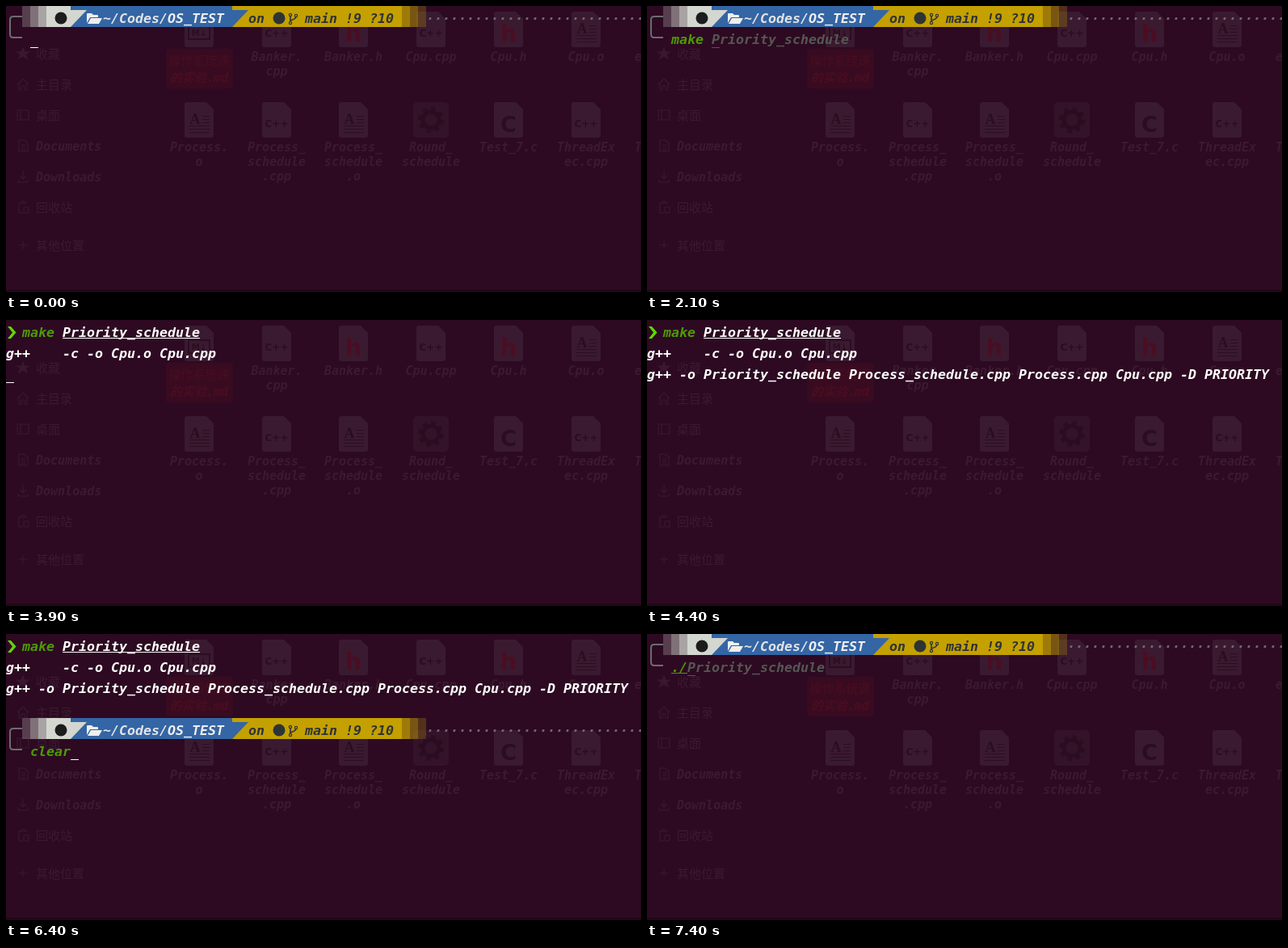
Recreate the animation shown at these times as an HTML page. Size 786x354 px, loop 8000 ms.

```html
<!DOCTYPE html>
<html lang="en">
<head>
<meta charset="utf-8">
<title>Terminal session</title>
<style>
  html, body { margin: 0; width: 100%; height: 100%; overflow: hidden; background: #2d0a22; }
  svg { display: block; width: 786px; height: 354px; }
  text { white-space: pre; font-family: "DejaVu Sans Mono", "Noto Sans CJK SC", monospace; font-weight: bold; font-style: oblique; }
  #screen text { font-size: 16.61px; }
  #desktop text { font-size: 15px; fill: #3b1a30; }
  #desktop .cjk { font-family: "Noto Sans CJK SC", "Noto Sans CJK", sans-serif; font-weight: normal; font-style: normal; }
  #desktop .mid { text-anchor: middle; }
  #desktop .glyph { font-family: "DejaVu Sans", sans-serif; font-style: normal; text-anchor: middle; fill: #2b0d21; }
  #desktop .red { fill: #4b0d21; }
</style>
</head>
<body>
<svg viewBox="0 0 786 354" xmlns="http://www.w3.org/2000/svg">
  <rect width="786" height="354" fill="#2d0a22"/>
  <rect y="351" width="786" height="3" fill="#240719"/>
  <g id="desktop"></g>
  <g id="screen"></g>
</svg>
<script>
const CELL = 10, ROW = 26, LOOP = 8000;
const WHITE = "#ffffff", GREEN = "#4e9a06", RED = "#cc0000", GREY = "#555753", INK = "#2e3436";
const LIGHT = "#d3d7cf", BLUE = "#3465a4", YELLOW = "#c4a000", FRAME = "#6c6c6c";
const FAINT = "#391830", TILE = "#3a1a30", CARVED = "#2b0d21";

const rect = (x, y, w, h, fill, extra = "") =>
  `<rect x="${x}" y="${y}" width="${w}" height="${h}" fill="${fill}" ${extra}/>`;
const path = (d, fill, extra = "") => `<path d="${d}" fill="${fill}" ${extra}/>`;
const label = (x, y, s, cls = "", extra = "") => `<text x="${x}" y="${y}" class="${cls}" ${extra}>${s}</text>`;

// Faint file manager behind the translucent terminal
function sidebar() {
  const places = [["收藏", 59], ["主目录", 97], ["桌面", 135], ["Documents", 173],
    ["Downloads", 211], ["回收站", 249], ["其他位置", 296]];
  const icons = [
    "M0-7L2-2L7-2L3 1L5 6L0 3L-5 6L-3 1L-7-2L-2-2Z",
    "M-7 0L0-7L7 0M-5-1V7H-2V2H2V7H5V-1",
    "M-7-6H7V6H-7ZM-3-6V6",
    "M-5-7H2L6-3V7H-5ZM-2-1H3M-2 2H3M-2 5H3",
    "M0-7V3M-4-1L0 3L4-1M-6 4V7H6V4",
    "M-6-5H5M-2-5V-7H2V-5M-5-5V7H0M1 0H7V7H1Z",
    "M-5 0H5M0-5V5"
  ];
  return places.map(([name, y], i) =>
    path(icons[i], i ? "none" : FAINT, `stroke="${FAINT}" stroke-width="1.2" transform="translate(21 ${y})"`)
    + label(37, y + 6, name, /^\w+$/.test(name) ? "" : "cjk")).join("");
}

function gear(cx, cy) {
  const ring = (r, w, dash = "") => `<circle cx="${cx}" cy="${cy}" r="${r}" fill="none" stroke="${CARVED}" stroke-width="${w}" ${dash}/>`;
  return rect(cx - 22, cy - 22, 44, 44, "#34132a", 'rx="5"') + ring(10, 5) + ring(14, 4, 'stroke-dasharray="5.5 5.5"');
}

function fileIcon(kind, cx, top) {
  if (kind === "gear") return gear(cx, top + 22);
  const x = cx - 18;
  const tile = path(`M${x + 3} ${top}H${x + 27}L${x + 36} ${top + 9}V${top + 41}q0 3-3 3H${x + 3}q-3 0-3-3V${top + 3}q0-3 3-3Z`, TILE);
  const mark = (size, text, dy, cls = "") => label(cx, top + dy, text, "glyph " + cls, `style="font-size:${size}px"`);
  if (kind === "o") {
    let lines = "";
    for (let i = 0; i < 6; i++) {
      const left = i < 3 ? cx + 4 : cx - 12;
      lines += rect(left, top + 17 + i * 4, cx + 13 - left, 1, CARVED);
    }
    return tile + lines + label(cx - 5, top + 27, "A", "glyph", 'style="font-size:18px;font-family:serif"');
  }
  if (kind === "md") return tile + rect(cx - 13, top + 18, 26, 16, "none", `stroke="${CARVED}" stroke-width="2"`) + mark(10, "M↓", 30);
  if (kind === "cpp") return tile + mark(12, "C++", 31);
  if (kind === "h") return tile + mark(28, "h", 37, "red");
  return tile + mark(27, "C", 37);
}

function files() {
  const rows = [
    ["md:", "cpp:Banker.|cpp", "h:Banker.h", "cpp:Cpu.cpp", "h:Cpu.h", "o:Cpu.o"],
    ["o:Process.|o", "cpp:Process_|schedule|.cpp", "o:Process_|schedule|.o", "gear:Round_|schedule", "c:Test_7.c", "cpp:ThreadEx|ec.cpp"]
  ];
  let s = rect(198, 53, 83, 49, "#390b20", 'rx="4"')
    + label(239, 73, "操作系统课", "cjk mid red") + label(239, 94, "的实验.md", "mid red")
    + label(778, 68, "e") + label(778, 180, "T");
  rows.forEach((row, r) => row.forEach((entry, c) => {
    const [kind, name] = entry.split(":"), cx = 239 + Math.round(c * 95.7);
    s += fileIcon(kind, cx, 7 + r * 112);
    name.split("|").forEach((part, i) => s += label(cx, 68 + r * 112 + i * 18, part, "mid"));
  }));
  return s;
}

// Terminal pieces, addressed by column and row
const word = (col, row, s, fill, underline = false) =>
  `<text x="${col * CELL}" y="${row * ROW + 21}" fill="${fill}">${s}</text>`
  + (underline ? rect(col * CELL, row * ROW + 22, s.length * CELL, 1, fill) : "");
const cursor = (col, row, fill = WHITE) => rect(col * CELL, row * ROW + 25, CELL, 1, fill);

function prompt(row) {
  const shade = (x, color, alpha) => rect(x, 0, 10, ROW, color, `fill-opacity="${alpha}"`);
  let s = path("M20 13H9Q5 13 5 17V35Q5 39 9 39H20", "none", `stroke="${FRAME}" stroke-width="2"`);
  [.25, .5, .75].forEach((a, i) => s += shade(20 + i * 10, LIGHT, a) + shade(510 - i * 10, YELLOW, a));
  s += rect(50, 0, 30, ROW, LIGHT) + rect(80, 0, 200, ROW, BLUE) + rect(280, 0, 210, ROW, YELLOW)
    + path("M80 5H100L80 26Z", LIGHT) + path("M280 5H300L280 26Z", BLUE)
    + `<circle cx="68" cy="15" r="7.5" fill="#1c1c1c"/><circle cx="338" cy="15" r="7.5" fill="${INK}"/>`
    + path("M100 21V10Q100 9 101 9H106L108 11H113Q114 11 114 12V14H104Z", "#eeeeee")
    + path("M101 22L105 15H119L115 22Z", "#eeeeee")
    + path("M352 12V20M359 13Q359 16 352 18", "none", `stroke="${INK}" stroke-width="1.6"`);
  for (const [x, y] of [[352, 11], [352, 21], [359, 12]])
    s += `<circle cx="${x}" cy="${y}" r="1.6" fill="${YELLOW}" stroke="${INK}" stroke-width="1.2"/>`;
  s += word(12, 0, "~/Codes/", "#e4e4e4") + word(20, 0, "OS_TEST", "#eeeeee")
    + word(30, 0, "on", INK) + word(37, 0, "main !9 ?10", INK)
    + word(52, 0, "·".repeat(27), FRAME);
  return `<g transform="translate(0 ${row * ROW})">${s}</g>`;
}

// Typed part in colour, suggested remainder in grey, cursor between them
const typing = (row, full, count, fill, underline) =>
  word(3, row, full.slice(0, count), fill, underline) + word(3 + count, row, full.slice(count), GREY)
  + cursor(3 + count, row, count < full.length ? GREY : WHITE);

const PROGRAM = "Priority_schedule", MAKE = "make " + PROGRAM, RUN = "./" + PROGRAM;
const top0 = prompt(0), top4 = prompt(4);
const makeLine = (col, row, underline) => word(col, row, "make", GREEN) + word(col + 5, row, PROGRAM, WHITE, underline);
const started = path("M2 8H6L12.5 15.5L6 23H2L8 15.5Z", "#5fd700") + makeLine(2, 0, true);
const compiled = started + word(0, 1, "g++    -c -o Cpu.o Cpu.cpp", WHITE);
const linked = compiled + word(0, 2, `g++ -o ${PROGRAM} Process_schedule.cpp Process.cpp Cpu.cpp -D PRIORITY`, WHITE);
const done = linked + top4;
const suggested = word(3, 1, "make", GREEN) + word(8, 1, PROGRAM, GREY);

const steps = [
  [0, top0 + cursor(3, 1)],
  [400, top0],
  [1000, top0 + cursor(3, 1)],
  [1400, top0 + typing(1, MAKE, 1, RED)],
  [1500, top0 + typing(1, MAKE, 2, RED)],
  [1600, top0 + typing(1, MAKE, 4, GREEN)],
  [2100, top0 + suggested + cursor(8, 1, GREY)],
  [2700, top0 + suggested],
  [3100, top0 + makeLine(3, 1, false) + cursor(25, 1)],
  [3200, top0 + makeLine(3, 1, true) + cursor(25, 1)],
  [3700, started + cursor(24, 0)],
  [3800, started + cursor(0, 1)],
  [3900, compiled + cursor(0, 2)],
  [4200, linked + cursor(0, 3)],
  [4400, linked],
  [5100, done + cursor(3, 5)],
  [5600, done],
  ...[1, 2, 3, 4, 5].map(n => [5900 + n * 100, done + typing(5, "clear", n, n < 5 ? RED : GREEN)]),
  [6500, top0 + cursor(3, 1)],
  [7100, top0],
  [7300, top0 + typing(1, RUN, 1, GREEN, true)],
  [7400, top0 + typing(1, RUN, 2, GREEN, true)]
];

document.getElementById("desktop").innerHTML = sidebar() + files();
const screenLayer = document.getElementById("screen");
let shown = null;

function render(time) {
  const step = steps.findLast(([start]) => start <= time);
  if (step === shown) return;
  shown = step;
  screenLayer.innerHTML = step[1];
}

const origin = performance.now();
function tick() {
  render((performance.now() - origin) % LOOP);
  requestAnimationFrame(tick);
}
render(0);
requestAnimationFrame(tick);
</script>
</body>
</html>
```
